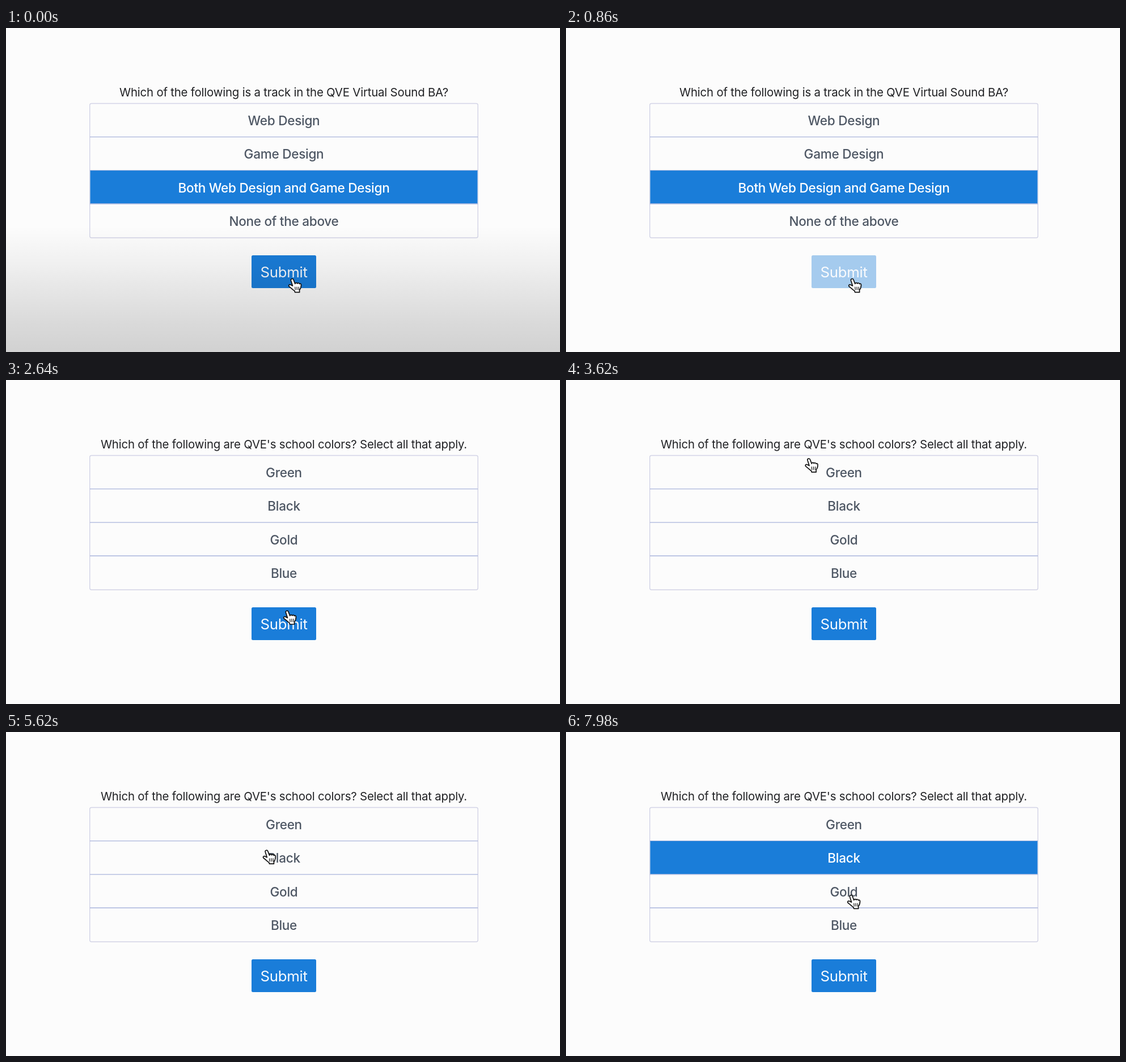
Recreate the animation shown at these times as an HTML page. Size 977 by 573 pixels, loop 8 s.

```html
<!DOCTYPE html>
<html lang="en">
<head>
<meta charset="utf-8">
<title>Quiz</title>
<style>
  html, body { margin: 0; width: 100%; height: 100%; overflow: hidden; background: #fcfcfc; }
  svg { display: block; width: 100vw; height: 100vh; }
  text { font-family: Inter, "Open Sans", sans-serif; text-anchor: middle; }
  .question { font-size: 20.4px; letter-spacing: -.2px; fill: #202124; }
  .option { font-size: 22.6px; font-weight: 500; letter-spacing: -.3px; }
  .submit { font-size: 25.8px; letter-spacing: -.3px; fill: #f8fbff; }
</style>
</head>
<body>
<svg viewBox="0 0 977 573">
  <defs>
    <linearGradient id="shade" gradientUnits="userSpaceOnUse" x1="0" y1="350" x2="0" y2="573">
      <stop offset="0" stop-opacity="0"/>
      <stop offset=".31" stop-opacity=".05"/>
      <stop offset=".5" stop-opacity=".087"/>
      <stop offset=".76" stop-opacity=".135"/>
      <stop offset="1" stop-opacity=".17"/>
    </linearGradient>
  </defs>
  <rect width="977" height="573" fill="#fcfcfc"/>
  <text id="question" class="question" x="490" y="121"></text>
  <rect x="147.75" y="133.5" width="684.5" height="237.5" rx="3" fill="none" stroke="#d3d4e6" stroke-width="1.4"/>
  <g id="rows"></g>
  <g id="button">
    <rect x="433" y="402" width="114" height="58" rx="2.5" fill="#1a7dd9"/>
    <text class="submit" x="490" y="440.5">Submit</text>
  </g>
  <rect id="overlay" y="350" width="977" height="223" fill="url(#shade)"/>
  <circle id="ring" r="45" fill="none" stroke="#111" stroke-width="2"/>
  <g id="hand" stroke="#111" stroke-linejoin="round" stroke-linecap="round">
    <path id="glove" fill="#fff" stroke-width="1.7" d="M-2.6 1.2C-3.2-1.6 1-2.6 2 .2L4.8 7.4C5.2 5.4 8 5 8.8 7
      C9.5 5.5 12 5.6 12.5 7.6C13.6 6.6 15.5 7.2 15.5 9.2C15.6 13 15 15.4 12.6 18.2V22.4H4.6L4 20
      C1 18.2-1.4 15.4-4 13.6C-7.6 11.4-6.6 8.4-3.4 9L.5 11Z"/>
    <path fill="none" stroke-width="1.2" d="M4.8 13.2L5.2 18M8 13L8.2 18M11.2 13V18"/>
  </g>
</svg>
<script>
const LOOP = 8000, SWAP = 1000, PICK = 7020;
const BLUE = '#1a7dd9', GREY = '#4e5764';
const $ = id => document.getElementById(id);
const clamp = v => Math.max(0, Math.min(1, v));
const ramp = (t, from, to) => clamp((t - from) / (to - from));
const smooth = p => p * p * (3 - 2 * p);

const quiz = [
  {
    question: 'Which of the following is a track in the QVE Virtual Sound BA?',
    options: ['Web Design', 'Game Design', 'Both Web Design and Game Design', 'None of the above']
  },
  {
    question: "Which of the following are QVE's school colors? Select all that apply.",
    options: ['Green', 'Black', 'Gold', 'Blue']
  }
];

// Fingertip positions: time, x, y
const path = [
  [0, 505, 445], [2500, 505, 445], [3150, 430, 152], [3620, 428.5, 140.5],
  [4100, 429, 150], [4920, 432, 194], [5760, 462, 212], [6600, 502, 217],
  [7320, 502, 217], [7860, 503, 290], [8000, 503, 290]
];

// Mouse presses: start and end of the ring
const presses = [[640, 860], [6940, 7160]];

function make(parent, tag, attrs) {
  const el = document.createElementNS('http://www.w3.org/2000/svg', tag);
  for (const key in attrs) el.setAttribute(key, attrs[key]);
  return parent.appendChild(el);
}

const rows = [0, 1, 2, 3].map(i => {
  const y = 133.4 + i * 59.2;
  if (i) make($('rows'), 'path', { d: `M148 ${y}H832`, stroke: '#aab4dc', 'stroke-width': 1.3 });
  return {
    fill: make($('rows'), 'rect', { x: 148.5, y: y + .3, width: 683, height: 58.4, fill: BLUE }),
    label: make($('rows'), 'text', { class: 'option', x: 490, y: y + 38.8 })
  };
});

function cursorAt(t) {
  const i = Math.max(1, path.findIndex(p => p[0] >= t));
  const [t0, x0, y0] = path[i - 1], [t1, x1, y1] = path[i];
  const p = smooth(ramp(t, t0, t1));
  return [x0 + (x1 - x0) * p, y0 + (y1 - y0) * p];
}

function setText(el, value) {
  if (el.textContent !== value) el.textContent = value;
}

function draw(t) {
  const page = quiz[t < SWAP ? 0 : 1];
  const selected = t < SWAP ? 2 : t >= PICK ? 1 : -1;
  setText($('question'), page.question);
  rows.forEach((row, i) => {
    const on = i === selected;
    setText(row.label, page.options[i]);
    row.label.setAttribute('fill', on ? '#fff' : GREY);
    row.fill.setAttribute('opacity', on ? 1 : 0);
  });

  $('button').setAttribute('opacity', t < SWAP ? 1 - .62 * ramp(t, 640, 700) : 1);
  $('overlay').setAttribute('opacity', 1 - ramp(t, 590, 850) ** 2);

  const [x, y] = cursorAt(t);
  $('hand').setAttribute('transform', `translate(${x} ${y})`);
  const press = presses.find(([from, to]) => t >= from && t < to);
  $('ring').setAttribute('cx', x + .5);
  $('ring').setAttribute('cy', y - 2);
  $('ring').setAttribute('opacity', press ? 1 - ramp(t, press[1] - 80, press[1]) : 0);
}

const start = performance.now();
function tick() {
  draw((performance.now() - start) % LOOP);
  requestAnimationFrame(tick);
}
tick();
</script>
</body>
</html>
```
